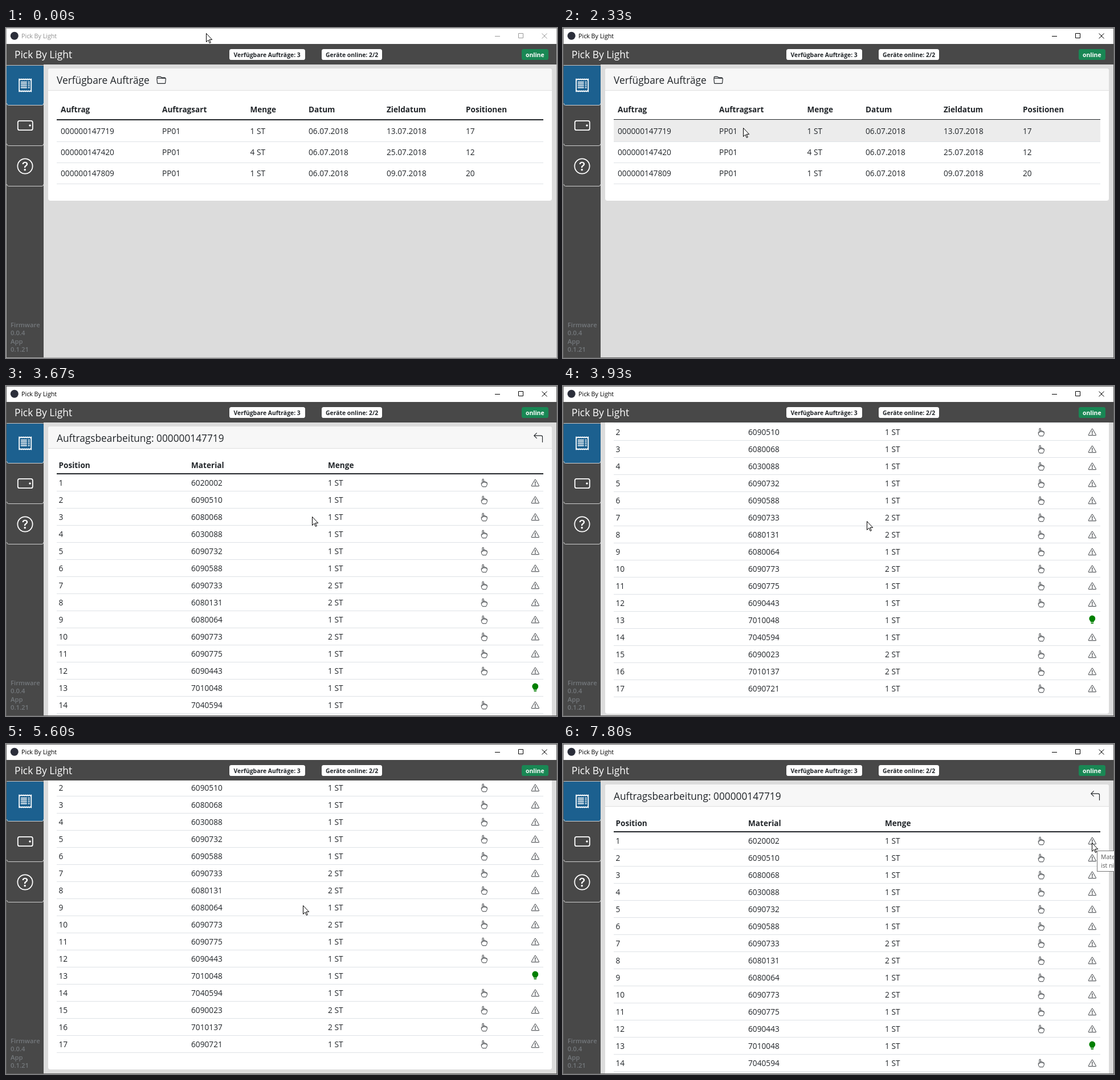
An HTML page that plays this animation: 967 px wide and 579 px high, repeating every 8 s.

```html
<!DOCTYPE html>
<html lang="de">
<head>
<meta charset="utf-8">
<title>Pick By Light</title>
<style>
html, body { margin: 0; width: 100%; height: 100%; overflow: hidden; background: #fff; }
svg { display: block; }
text { font: 13.7px "Open Sans", "Noto Sans", sans-serif; fill: #212529; }
.b { font-weight: 700; font-size: 13.6px; }
.h { font-weight: 500; font-size: 17.3px; }
.brand { font-size: 17.4px; fill: #fff; }
.win { font-size: 10.7px; fill: inherit; }
.badge { font-weight: 700; font-size: 10.4px; }
.ver { font-weight: 600; font-size: 11.3px; fill: #74787c; }
.tip { font-size: 10.4px; fill: #575757; }
.line { fill: none; stroke: currentColor; stroke-linecap: round; stroke-linejoin: round; }
</style>
</head>
<body>
<script>
const rect = (x, y, w, h, fill, r = 0) =>
  `<rect x="${x}" y="${y}" width="${w}" height="${h}" rx="${r}" fill="${fill}"/>`;
const text = (x, y, s, cls = '', more = '') => `<text x="${x}" y="${y}" class="${cls}" ${more}>${s}</text>`;
const group = (id, body) => `<g id="${id}">${body}</g>`;
// Icons are drawn on a 16 by 16 grid
const icon = (x, y, size, color, body) =>
  `<g transform="translate(${x} ${y}) scale(${size / 16})" color="${color}" fill="${color}">${body}</g>`;
const stroke = (d, w = 1) => `<path class="line" stroke-width="${w}" d="${d}"/>`;
const fill = d => `<path d="${d}"/>`;

const INK = '#212529', RULE = '#dee2e6', DARK = '#484848';

const receipt = stroke('M1.5 1.2' + 'l1.083.8 1.083-.8'.repeat(6) + 'V14.8' + 'l-1.083-.8-1.083.8'.repeat(6) + 'z', 1.1)
  + stroke([4.5, 6.5, 8.5, 10.5].map(y => `M3.5 ${y}h6M11.5 ${y}h1`).join(''));
const question = '<circle class="line" cx="8" cy="8" r="7.5"/>' + fill(
  'M5.255 5.786a.237.237 0 0 0 .241.247h.825c.138 0 .248-.113.266-.25.09-.656.54-1.134 1.342-1.134.686 0 1.314.343 1.314 1.168 0 .635-.374.927-.965 1.371-.673.489-1.206 1.06-1.168 1.987v.217a.25.25 0 0 0 .25.246h.811a.25.25 0 0 0 .25-.25v-.105c0-.718.273-.927 1.01-1.486.609-.463 1.244-.977 1.244-2.056 0-1.511-1.276-2.241-2.673-2.241-1.267 0-2.655.59-2.75 2.286z')
  + '<circle cx="7.83" cy="11.54" r="1"/>';
const folder = stroke('M1.2 6l.6 6.2a1 1 0 0 0 1 .9h10.4a1 1 0 0 0 1-.9l.6-6.2a1 1 0 0 0-1-1.1H2.2a1 1 0 0 0-1 1.1zM1.5 5V3.5a1 1 0 0 1 1-1h3.7c1.4 0 1.6 1.5 3 1.5h4c.8 0 1.2.4 1.2 1');
const back = fill('M1.146 4.854a.5.5 0 0 1 0-.708l4-4a.5.5 0 1 1 .708.708L2.707 4H12.5A2.5 2.5 0 0 1 15 6.5v8a.5.5 0 0 1-1 0v-8A1.5 1.5 0 0 0 12.5 5H2.707l3.147 3.146a.5.5 0 1 1-.708.708z');
const hand = stroke('M5.5 9V1.75a1.25 1.25 0 0 1 2.5 0V8V5c1.2 0 2.5 0 2.5 1.2V8V6c1.2-.1 1.8 0 2.5 1V8.5V7h.4c1 0 1.5.7 1.4 1.6l-.3 2.7c0 .5-.1.9-.4 1.3l-1.5 2.9H6l-1.8-2.6c-.2-.3-.3-.6-.3-.9L3.5 9c0-.5.2-.9.8-1l1.2-.3');
const warning = stroke('M7.5 1.8a.57.57 0 0 1 1 0l6.8 11.7c.3.5 0 1-.5 1H1.2c-.5 0-.8-.5-.5-1z')
  + stroke('M8 6v3.5', 1.3) + '<circle cx="8" cy="12" r="1"/>';
const bulb = fill('M2 6a6 6 0 1 1 10.174 4.31c-.203.196-.359.4-.453.619l-.762 1.769A.5.5 0 0 1 10.5 13h-5a.5.5 0 0 1-.46-.302l-.761-1.77a2 2 0 0 0-.453-.618A6 6 0 0 1 2 6zm3 8.5a.5.5 0 0 1 .5-.5h5a.5.5 0 0 1 0 1l-.224.447a1 1 0 0 1-.894.553H6.618a1 1 0 0 1-.894-.553L5.5 15a.5.5 0 0 1-.5-.5z');

const card = (bottom, title) => rect(74, 71, 884, bottom - 71, '#fff', 4)
  + `<path fill="#f7f7f7" d="M74 109V75a4 4 0 0 1 4-4h876a4 4 0 0 1 4 4v34z"/>`
  + rect(74, 109, 884, 1, '#dfdfdf') + text(89, 98, title, 'h');
const row = (xs, y, cells, cls) => cells.map((s, i) => text(xs[i], y, s, cls)).join('');

function orders() {
  const xs = [96, 274, 428.5, 531, 668, 807];
  const rows = [
    ['000000147719', 'PP01', '1 ST', '06.07.2018', '13.07.2018', '17'],
    ['000000147420', 'PP01', '4 ST', '06.07.2018', '25.07.2018', '12'],
    ['000000147809', 'PP01', '1 ST', '06.07.2018', '09.07.2018', '20']];
  return card(303, 'Verfügbare Aufträge') + icon(263.5, 82.5, 18.2, INK, folder)
    + row(xs, 148, ['Auftrag', 'Auftragsart', 'Menge', 'Datum', 'Zieldatum', 'Positionen'], 'b')
    + rect(89, 160, 854, 2, INK) + group('hover', rect(89, 161, 854, 38, '#ececec'))
    + rows.map((r, i) => row(xs, 186 + 37.2 * i, r) + rect(89, 199 + 37 * i, 854, 1, RULE)).join('');
}

function positions() {
  const xs = [92.5, 325, 565];
  const items = [6020002, 6090510, 6080068, 6030088, 6090732, 6090588, 6090733, 6080131, 6080064,
    6090773, 6090775, 6090443, 7010048, 7040594, 6090023, 7010137, 6090721];
  const pairs = [7, 8, 10, 15, 16];
  return card(694, 'Auftragsbearbeitung: 000000147719') + icon(925, 82, 18.2, INK, back)
    + row(xs, 144, ['Position', 'Material', 'Menge'], 'b') + rect(89, 153, 854, 2, INK)
    + items.map((m, i) => {
      const n = i + 1, y = 30 * i;
      const icons = n === 13 ? icon(921.5, 521.5, 14.56, 'green', bulb)
        : icon(831, 162.7 + y, 14.56, INK, hand) + icon(921.5, 162.5 + y, 14.56, INK, warning);
      return row(xs, 175 + y, [n, m, (pairs.includes(n) ? 2 : 1) + ' ST']) + icons + rect(89, 184 + y, 854, 1, RULE);
    }).join('');
}

const edge = y => `<path class="line" stroke="#d0d0d0" d="M1.5 ${y - 3}q0 3 3 3H63q3 0 3-3"/>`;
const sidebar = rect(0, 64, 66, 515, DARK) + rect(1, 66, 65, 70, '#1c608f', 3)
  + rect(1, 65, 65, 1, '#c4c4c4') + `<g color="#d0d0d0">${[135.5, 206.5, 277.5].map(edge).join('')}</g>`
  + icon(20.7, 87.5, 26, '#fff', receipt)
  + '<rect x="20.8" y="162.8" width="26" height="16.4" rx="3" fill="none" stroke="#fff" stroke-width="1.8"/>'
  + '<circle cx="42" cy="171" r="1.8" fill="#fff"/>'
  + icon(19.5, 228.5, 28, '#fff', question)
  + ['Firmware', '0.0.4', 'App', '0.1.21'].map((s, i) => text(8, 524.5 + 14.5 * i, s, 'ver')).join('');

const header = rect(0, 28, 967, 36, DARK) + text(15, 53, 'Pick By Light', 'brand')
  + rect(392, 37, 133, 19, '#fff', 3.6) + text(399.5, 51, 'Verfügbare Aufträge: 3', 'badge')
  + rect(554, 37, 106, 19, '#fff', 3.6) + text(561, 51, 'Geräte online: 2/2', 'badge')
  + rect(905, 37, 47, 19, '#198754', 3.6) + text(912, 51, 'online', 'badge', 'style="fill:#fff"');

const titleBar = rect(0, 0, 967, 28, '#fff') + '<circle cx="14.8" cy="13.8" r="7" fill="#2b2e3a"/>'
  + group('title', text(27, 18, 'Pick By Light', 'win')
    + '<path class="line" style="stroke-linecap:butt" d="M858 14.5h9M899.5 9.5h8v8h-8zM940.5 9.5l9 9M949.5 9.5l-9 9"/>');

document.body.innerHTML = `<svg width="967" height="579">
  ${rect(0, 0, 967, 579, '#dcdcdc')}
  <svg x="66" y="64" width="900" height="514" viewBox="66 64 900 514">
    ${group('orders', orders())}${group('positions', positions())}
  </svg>
  ${titleBar}${header}${sidebar}
  <rect id="frame" x=".5" y=".5" width="966" height="578" fill="none"/>
  <path id="cursor" fill="#fff" stroke="#000" d="M.5.5V15.5l3.5-3.4 2.3 5.4 2-.9-2.3-5.2h4.7z"/>
  ${group('tip', '<rect x="937.5" y="187.5" width="60" height="36" fill="#fff" stroke="#767676"/>'
    + text(944, 202, 'Material', 'tip') + text(944, 217, 'ist nicht', 'tip'))}
</svg>`;

// Times are in steps of 1/15 s
const path = [[15, 351, 9], [28, 310, 179], [29, 316, 175], [45, 316, 175], [55, 537, 229], [59, 533, 237],
  [60, 531, 240], [66, 531, 240], [72, 521, 283], [83, 521, 283], [89, 521, 281], [95, 521, 281],
  [103, 921, 168], [106, 921, 168], [109, 928, 173]];
const part = (k, from, to) => Math.min(1, Math.max(0, (k - from) / (to - from)));
const smooth = u => u * u * (3 - 2 * u);
const glide = u => u ** 2.9 / (u ** 2.9 + (1 - u) ** 2.9);

function pointer(k) {
  let [, x, y] = path[0];
  for (let i = 1; i < path.length; i++) {
    const u = smooth(part(k, path[i - 1][0], path[i][0]));
    x += (path[i][1] - path[i - 1][1]) * u;
    y += (path[i][2] - path[i - 1][2]) * u;
  }
  return [Math.round(x), Math.round(y)];
}

const el = id => document.getElementById(id);
const show = (id, on) => el(id).setAttribute('display', on ? 'inline' : 'none');

function draw(now) {
  const k = Math.floor((now % 8000 + 4) * 15 / 1000);
  const [x, y] = pointer(k);
  const active = k >= 34, detail = k >= 36;
  const scroll = Math.round(124 * (glide(part(k, 56, 60)) - glide(part(k, 83, 90))));
  el('cursor').setAttribute('transform', `translate(${x} ${y})`);
  el('positions').setAttribute('transform', `translate(0 ${-scroll})`);
  el('title').setAttribute('color', active ? '#000' : '#999');
  el('title').setAttribute('fill', active ? '#000' : '#8f8f8f');
  el('frame').setAttribute('stroke', active ? '#606060' : '#aaa');
  show('orders', !detail);
  show('positions', detail);
  show('hover', y > 161 && y < 199);
  show('tip', k >= 117);
  requestAnimationFrame(draw);
}
requestAnimationFrame(draw);
</script>
</body>
</html>
```
